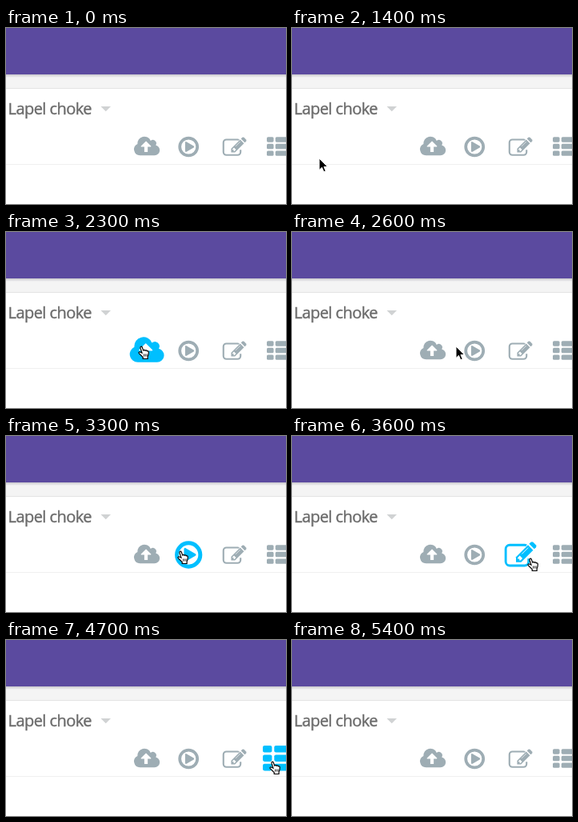
An HTML page that plays this animation: 350x220 px, repeating every 6000 ms.

```html
<!DOCTYPE html>
<html lang="en">
<head>
<meta charset="utf-8">
<title>Toolbar hover</title>
<style>
  html, body { margin: 0; width: 100%; height: 100%; overflow: hidden; background: #fff; }
  svg { display: block; width: 350px; height: 220px; }
  text {
    font: 20px "Open Sans", "Noto Sans", sans-serif; letter-spacing: -.55px;
    fill: #6b6b6b; stroke: #6b6b6b; stroke-width: .4px;
  }
  .icon { fill: currentColor; stroke-linejoin: round; }
  .line { fill: none; stroke: currentColor; }
  .solid { stroke: currentColor; }
  .cut { fill: #fff; stroke: #fff; }
</style>
</head>
<body>
<svg viewBox="0 0 350 220">
  <defs>
    <linearGradient id="shade" x2="0" y2="1">
      <stop stop-color="#c9c8cd"/>
      <stop offset="1" stop-color="#f4f4f4"/>
    </linearGradient>
  </defs>
  <rect width="350" height="220" fill="#fff"/>
  <rect width="350" height="75" fill="#f4f4f4"/>
  <rect width="350" height="58" fill="#5b4a9f"/>
  <rect y="58" width="350" height="4" fill="url(#shade)"/>
  <rect y="75" width="350" height="1" fill="#e4e4e4"/>
  <rect y="170" width="350" height="1" fill="#f0f0f0"/>
  <text x="2.6" y="108">Lapel choke</text>
  <path d="M118.5 98h12.5l-6.25 6.3z" fill="#d0d2d3"/>

  <!-- Icons are drawn on a grid of 1792 units, centred on 896, 896. -->
  <g class="icon">
    <g transform="translate(-64)">
      <path d="M448 1536A448 448 0 0 1 258 683A512 512 0 0 1 1242 446A256 256 0 0 1 1623 778A384 384 0 0 1 1536 1536z"/>
      <path class="cut" d="M896 516L1244 864H992V1248H800V864H548z" stroke-width="64"/>
    </g>
  </g>
  <g class="icon">
    <circle class="line" cx="896" cy="896" r="656" stroke-width="224"/>
    <path class="solid" d="M704 576V1216L1248 896z" stroke-width="128"/>
  </g>
  <g class="icon">
    <path class="line" d="M1230 345Q1180 320 1120 320H288A224 224 0 0 0 64 544V1248A224 224 0 0 0 288 1472H1120A224 224 0 0 0 1344 1248V1085" stroke-width="128"/>
    <path d="M1312 320l288 288-672 672h-288v-288z"/>
    <path d="M1376 256L1468 164Q1536 108 1604 164L1756 316Q1812 384 1756 452L1664 544z"/>
    <path class="cut" d="M888 1184l116-116-152-152-116 116v56h96v96z"/>
    <path class="cut" d="M968 824L1318 474" stroke-width="40"/>
  </g>
  <g class="icon">
    <g id="row">
      <rect y="128" width="512" height="384" rx="96"/>
      <rect x="640" y="128" width="1152" height="384" rx="96"/>
    </g>
    <use href="#row" y="512"/>
    <use href="#row" y="1024"/>
  </g>

  <g id="arrow">
    <path d="M0 0V14.5L3.4 11.3 5.8 16.8 8.2 15.8 5.9 10.5H10.5Z" stroke="#fff"/>
  </g>
  <g id="hand">
    <g transform="translate(-5 0)" stroke="#000" stroke-width="1.2">
      <path d="M5 9.2L3 3.2C2.4 1 4.6.4 5.3 2.2L6.7 6Q8.5 4.5 9.1 6.3Q10.8 5.2 11.3 6.8Q13 6.4 13.3 8Q13.5 10.6 12.1 14V16.5H6.2V14.6L1.4 9.8C.2 8.4 1.8 7.3 3.1 8.3Z" fill="#fff"/>
      <path d="M7.5 10.5v3m1.8-3v3m1.8-3v3" stroke-width=".8"/>
    </g>
  </g>
</svg>
<script>
const LOOP = 6000, STEP = 100, FADE = 200;
const UNIT = 30 / 1792, GROWTH = 4 / 3;
const GREY = [158, 173, 180], BLUE = [0, 191, 255];

// Centre of each icon, and the times the pointer enters and leaves it.
const icons = [
  { x: 176.1, y: 148.5, on: 1885, off: 2400 },
  { x: 228.2, y: 148.5, on: 2700, off: 3400 },
  { x: 285.7, y: 149.1, on: 3400, off: 4400 },
  { x: 341, y: 149.1, on: 4500, off: 5200 }
];

// The pointer glides from stop to stop and rests between glides.
const entry = { x: 34, y: 163 };
const glides = [
  { start: 1400, end: 1900, x: 170, y: 142 },
  { start: 2300, end: 2900, x: 219, y: 143 },
  { start: 3300, end: 3600, x: 299, y: 152 },
  { start: 4200, end: 4700, x: 334, y: 151 },
  { start: 5000, end: 5400, x: 342, y: 202 }
];

const shapes = document.querySelectorAll(".icon");
const arrow = document.getElementById("arrow");
const hand = document.getElementById("hand");

const clamp = v => Math.max(0, Math.min(1, v));
const mix = (a, b, k) => a + (b - a) * k;
const easeOut = k => Math.sin(clamp(k) * Math.PI / 2);

function pointerAt(t) {
  let { x, y } = entry;
  for (const glide of glides) {
    const k = easeOut((t - glide.start) / (glide.end - glide.start));
    x = mix(x, glide.x, k);
    y = mix(y, glide.y, k);
  }
  return [x, y];
}

function drawIcon({ x, y, on, off }, shape, t) {
  const level = Math.min(clamp((t - on) / FADE), clamp((off - t) / FADE + .5));
  const scale = UNIT * mix(1, GROWTH, level);
  shape.setAttribute("transform", `translate(${x} ${y}) scale(${scale}) translate(-896 -896)`);
  shape.style.color = `rgb(${GREY.map((c, i) => Math.round(mix(c, BLUE[i], level)))})`;
}

function place(cursor, position, visible) {
  cursor.style.display = visible ? "" : "none";
  cursor.setAttribute("transform", `translate(${position.map(Math.round)})`);
}

function draw() {
  const t = Math.floor(performance.now() % LOOP / STEP) * STEP;
  icons.forEach((icon, i) => drawIcon(icon, shapes[i], t));
  const position = pointerAt(t);
  const present = t >= glides[0].start && t < glides.at(-1).end;
  const hovering = icons.some(icon => t >= icon.on && t < icon.off);
  place(arrow, position, present && !hovering);
  place(hand, position, present && hovering);
  requestAnimationFrame(draw);
}
draw();
</script>
</body>
</html>
```
